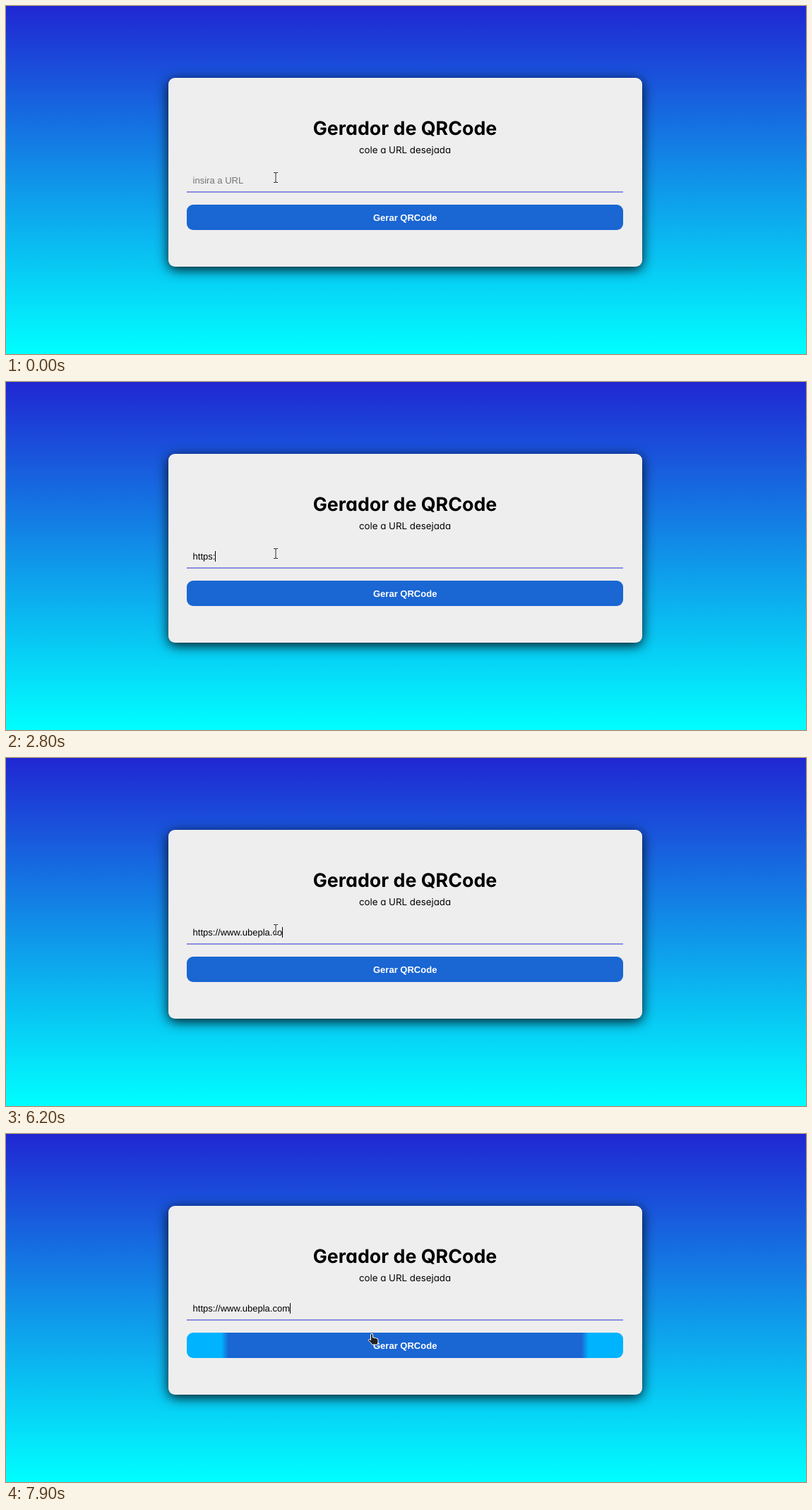
Animation, 1133 px wide and 494 px high, one loop 8 s. Source, as an HTML page:

```html
<!DOCTYPE html>
<html lang="pt">
<head>
<meta charset="utf-8">
<title>Gerador</title>
<style>
  html, body { margin: 0; width: 100%; height: 100%; overflow: hidden; }
  body { background: linear-gradient(#2027d2, #00ffff); }
  .card {
    position: absolute; left: 230px; top: 102px; width: 671px; height: 268px;
    border-radius: 9px; background: #eee; box-shadow: 0 4px 17px rgba(0, 0, 0, .9);
  }
  .button {
    position: absolute; left: 256px; top: 282px; width: 618px; height: 36px;
    border-radius: 9px; background: #1a66d2;
  }
  svg { position: absolute; left: 0; top: 0; }
  text { text-rendering: geometricPrecision; white-space: pre; }
  .title, .hint { font-family: Inter, "Open Sans", sans-serif; font-feature-settings: "cv11"; text-anchor: middle; }
  .title { font-size: 26.8px; font-weight: 700; }
  .hint { font-size: 13.3px; }
  .field, .label { font: 13.03px "Liberation Sans", Arial, sans-serif; }
  .label { font-weight: 700; fill: #fff; text-anchor: middle; }
</style>
</head>
<body>
<div class="card"></div>
<div class="button" id="button"></div>
<svg width="1133" height="494" viewBox="0 0 1133 494">
  <text class="title" x="565" y="183">Gerador de QRCode</text>
  <text class="hint" x="565" y="209">cole a URL desejada</text>
  <rect x="256" y="263.5" width="618" height="1" fill="#2c2dd0"/>
  <text class="field" id="field" x="264.6" y="252"></text>
  <rect id="caret" y="240" width="1" height="15"/>
  <text class="label" x="565.2" y="304.7">Gerar QRCode</text>

  <!-- pointers, each drawn around its own hot spot -->
  <g id="beam" fill="none">
    <path d="M-3.5-7H-1Q0-7 0-6Q0-7 1-7H3.5M0-6V6M-3.5 7H-1Q0 7 0 6Q0 7 1 7H3.5" stroke="#fff" stroke-width="2.4" opacity=".75"/>
    <path d="M-3-7H-1Q0-7 0-6Q0-7 1-7H3M0-6V6M-3 7H-1Q0 7 0 6Q0 7 1 7H3" stroke="#222"/>
  </g>
  <path id="arrow" d="M0 0V14L3.3 11L5.4 16L7.8 15L5.7 10.2H10Z" fill="#222" stroke="#fff"/>
  <path id="hand" d="M-1.3 1Q-1.3-.6 0-.6T1.5 1V5Q3-.1+4.7 4 5.3Q5.8 4.9 6.4 6Q9 5.6 9 8V11Q9 13 7.6 14.8H.6Q-.6 12-4-.1+9Q-4.9 7.6-3.6 7T-1.3 8.5Z" fill="#222" stroke="#fff"/>
</svg>
<script>
  const LOOP = 8000;
  const URL_TEXT = "https://www.ubepla.com";
  // when each character is typed, in ms
  const KEYS = [1200, 1600, 1800, 2100, 2200, 2800, 3600, 3700, 4200, 4500, 4600, 4700,
    5000, 5100, 5300, 5400, 5500, 5700, 6000, 6100, 6200, 6300];
  const BLINKS = [[0, 100], [600, 1200], [3500, 3600], [7000, 7600]];
  const POINTER = [
    [0, "beam", 382, 243.5],
    [7500, "beam", 486.5, 262],
    [7600, "arrow", 504, 271],
    [7700, "arrow", 513, 278],
    [7800, "hand", 517, 283],
    [7900, "hand", 518, 284]
  ];
  const GLOW = [[0, 0], [7800, 12], [7900, 54]];

  const byId = id => document.getElementById(id);
  const field = byId("field"), caret = byId("caret"), button = byId("button");
  const pointers = ["beam", "arrow", "hand"].map(byId);
  const at = (steps, t) => steps.filter(s => s[0] <= t).pop();

  byId("hand").setAttribute("d",
    "M-1.5 1Q-1.5-.6 0-.6T1.5 1V5Q3.2 4.4 4 5.6Q5.6 4.9 6.4 6.2Q9 5.8 9 8.3V11Q9 13 7.6 15H.6" +
    "Q-1 12.4-4.2 9.4Q-5 8-3.7 7.4T-1.5 8.7Z");

  function drawField(t) {
    const count = KEYS.filter(k => k <= t).length;
    const typed = URL_TEXT.slice(0, count);
    const shown = typed || "insira a URL";
    if (field.textContent !== shown) field.textContent = shown;
    field.setAttribute("fill", typed ? "#000" : "#757575");
    const width = count ? field.getComputedTextLength() : 0;
    caret.setAttribute("x", Math.floor(264.8 + width + (count ? 0 : .3)));
    const hidden = BLINKS.some(([from, to]) => t >= from && t < to);
    caret.setAttribute("visibility", hidden ? "hidden" : "visible");
  }

  function drawPointer(t) {
    const [, kind, x, y] = at(POINTER, t);
    for (const p of pointers) {
      p.setAttribute("visibility", p.id === kind ? "visible" : "hidden");
      p.setAttribute("transform", `translate(${x} ${y})`);
    }
  }

  function drawGlow(t) {
    const w = at(GLOW, t)[1], soft = 5;
    button.style.backgroundImage = w
      ? `linear-gradient(90deg, #00b3ff ${w - soft}px, #1a66d2 ${w + soft}px,
         #1a66d2 calc(100% - ${w + soft}px), #00b3ff calc(100% - ${w - soft}px))`
      : "none";
  }

  function frame() {
    const t = performance.now() % LOOP;
    drawField(t);
    drawPointer(t);
    drawGlow(t);
    requestAnimationFrame(frame);
  }
  frame();
</script>
</body>
</html>
```
